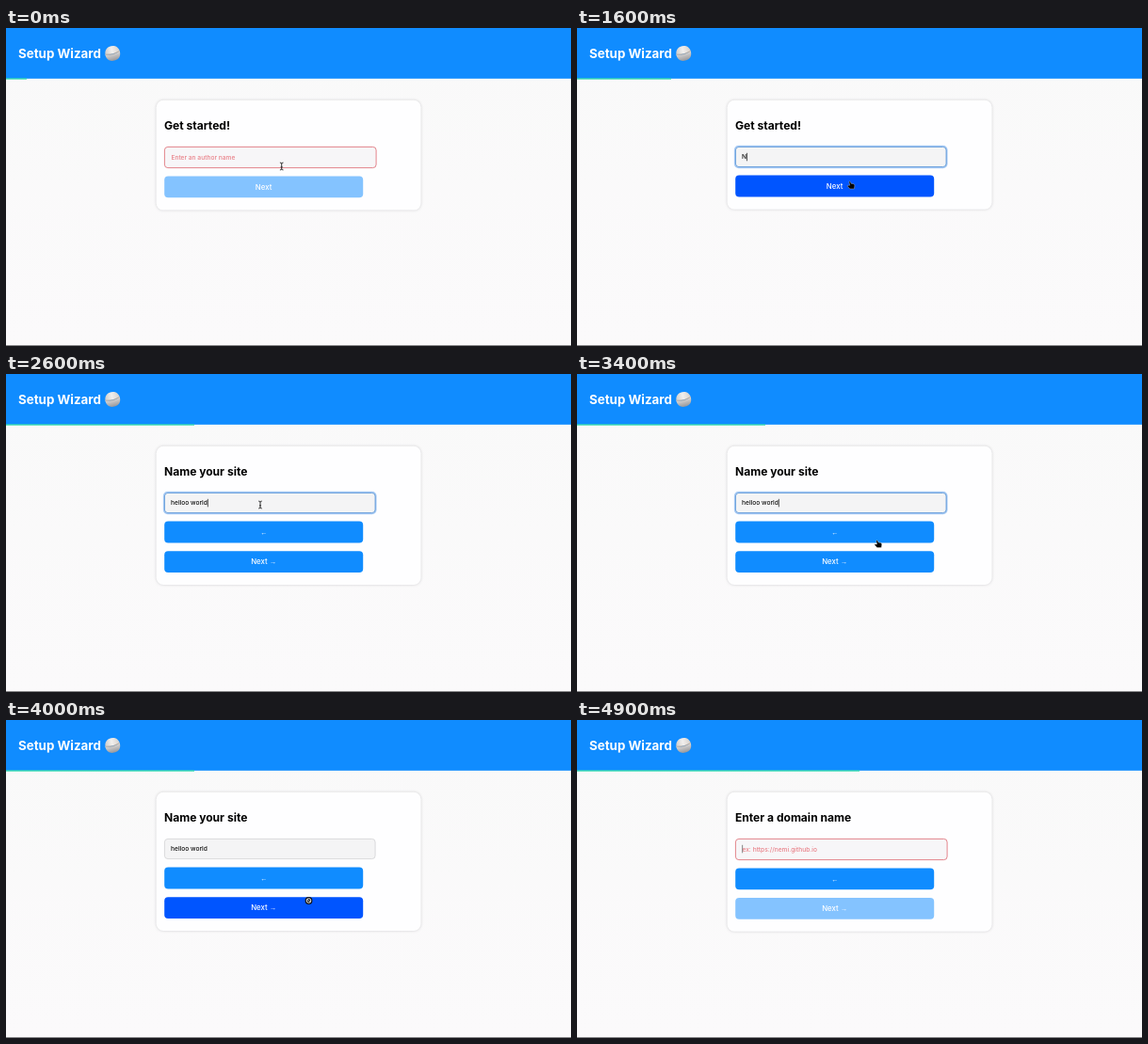
Animation of 600x338 px, one loop 5000 ms. Source, as an HTML page:

```html
<!DOCTYPE html>
<html lang="en">
<head>
<meta charset="utf-8">
<title>Setup Wizard</title>
<style>
  html, body { margin: 0; width: 100%; height: 100%; overflow: hidden; background: #fafafa; }
  svg { display: block; width: 100vw; height: 100vh; }
  text { font-family: Inter, Roboto, sans-serif; white-space: pre; }
  #title { font-size: 13.35px; font-weight: 700; fill: #fff; }
  #heading { font-size: 12.05px; font-weight: 700; }
  #value { font-size: 6.65px; font-weight: 500; }
  .label { font-size: 7.8px; font-weight: 500; fill: #fff; text-anchor: middle; }
  .arrow { font-family: "Liberation Sans", sans-serif; font-size: 7.3px; }
  #card { filter: drop-shadow(0 0 1.8px rgba(30, 30, 40, .2)); }
</style>
</head>
<body>
<svg viewBox="0 0 600 338">
  <defs>
    <linearGradient id="page" x2="0" y2="1">
      <stop stop-color="#f9f9f9"/><stop offset="1" stop-color="#fbfafb"/>
    </linearGradient>
    <linearGradient id="bowl" x2="0" y2="1">
      <stop stop-color="#dcdad9"/><stop offset="1" stop-color="#98989b"/>
    </linearGradient>
    <linearGradient id="grains">
      <stop stop-color="#cfcdcc"/><stop offset=".5" stop-color="#f1efed"/><stop offset="1" stop-color="#d8d2cd"/>
    </linearGradient>
  </defs>
  <rect width="600" height="338" fill="url(#page)"/>
  <rect width="600" height="53.8" fill="#108cff"/>
  <rect id="progress" y="53.4" height="1.2" fill="#20dba6"/>
  <rect y="337" width="600" height="1" fill="#858587"/>
  <text id="title" x="13" y="32">Setup Wizard</text>
  <g transform="translate(113.2 26.8) rotate(-14)">
    <path d="M-7.800 .5C-8.500-10.500 8.500-10.500 7.800 .5Z" fill="url(#grains)"/>
    <path d="M-8-.5Q0 2.500 8-.5C8 5 5 8 0 8S-8 5-8-.5Z" fill="url(#bowl)"/>
    <path d="M-7.600-.4Q0 2.500 7.600-.4" fill="none" stroke="#b5a699" stroke-width=".8"/>
  </g>

  <rect id="card" x="159.600" y="76.700" width="281" rx="7.500" fill="#fefeff"/>
  <text id="heading" x="168" y="108"></text>
  <rect id="ring" x="167.600" y="125.600" width="225.200" height="22.800" rx="4" fill="none" stroke="#a9cbf5" stroke-width="1.500"/>
  <rect id="field" x="168.400" y="126.400" rx="3.500"/>
  <text id="value"></text>
  <rect id="caret" y="132.800" width=".7" height="8.500"/>
  <g id="back">
    <rect x="168.200" width="211" height="22.800" rx="4" fill="#108cff"/>
    <text class="label" x="273.600" y="14.300"><tspan class="arrow">←</tspan></text>
  </g>
  <g id="next">
    <rect id="nextFill" x="168.200" width="211" height="22.800" rx="4"/>
    <text class="label" x="273.600" y="14.300">Next<tspan id="nextArrow" class="arrow"> →</tspan></text>
  </g>

  <g id="ibeam" fill="none" stroke="#222" stroke-width=".9">
    <path d="M-1.800-3.900Q0-3.900 0-2.800Q0-3.900 1.800-3.900M0-3V3M-1.800 3.900Q0 3.900 0 2.800Q0 3.900 1.800 3.900M-1 .8H1"/>
  </g>
  <g id="hand">
    <path d="M-1.800-4Q-.8-4.800-.2-3.700L.5-2L3.200-1.600Q4.300-1.300 4.200 .5L3.700 3.600H-.8L-3.400 .8Q-3.600-.6-2.200 0L-1-.1Z" fill="#050505" stroke="#fff" stroke-width=".3"/>
  </g>
  <g id="denied" fill="none">
    <circle r="3.900" fill="#111"/>
    <circle r="2.300" stroke="#fff" stroke-width=".9"/>
    <path d="M-1.600-1.600L1.600 1.600" stroke="#fff" stroke-width=".9"/>
  </g>
</svg>
<script>
const LOOP = 5000, STEP = 100;
const $ = id => document.getElementById(id);
const clamp = x => Math.max(0, Math.min(1, x));
const set = (el, attrs) => { for (const key in attrs) el.setAttribute(key, attrs[key]); };
const show = (el, on) => { el.style.display = on ? "" : "none"; };
const between = (t, a, b) => t >= a && t < b;
const mixColor = (a, b, k) => `rgb(${a.map((v, i) => Math.round(v + (b[i] - v) * k))})`;

const BLUE = [16, 140, 255], DARK = [0, 85, 255];
const pages = [
  { start: 0, heading: "Get started!", hint: "Enter an author name" },
  { start: 1800, heading: "Name your site", hint: "" },
  { start: 4200, heading: "Enter a domain name", hint: "ex: https://nemi.github.io" }
];

// Pointer paths: [time, x, y]; each path is visible from its first to its last time.
const paths = [
  [[0, 292.7, 147], [300, 268, 139], [700, 268, 139]],
  [[1200, 268, 139], [1500, 290, 166], [1800, 292, 170]],
  [[2200, 292, 160], [2400, 270, 139], [2700, 270, 139]],
  [[3000, 300, 138], [3400, 319.5, 181], [3600, 321.5, 192], [4200, 321.5, 192],
   [4500, 279.3, 164.3], [4700, 255, 139], [4800, 250, 138]]
];

function pointerAt(t) {
  const path = paths.find(p => between(t, p[0][0], p[p.length - 1][0]));
  if (!path) return null;
  const i = path.findIndex(p => p[0] > t);
  const [t0, x0, y0] = path[i - 1], [t1, x1, y1] = path[i];
  const k = (t - t0) / (t1 - t0);
  return { x: x0 + (x1 - x0) * k, y: y0 + (y1 - y0) * k };
}

function pointerKind(p, t) {
  if (between(t, 3900, 4400)) return "denied";
  return p.y < 150 ? "ibeam" : "hand";
}

// How far the Next button has faded to its hover colour.
function hoverAmount(t) {
  if (t < 1800) return clamp((t - 1400) / 200);
  if (t < 3500) return 0;
  return t < 4500 ? clamp((t - 3500) / 200) : 1 - clamp((t - 4500) / 300);
}

function progressAt(t, index) {
  const elapsed = t - pages[index].start;
  const from = index * 100;
  const rest = index ? .3 : .78;
  const duration = index ? 100 : 300;
  return from + 100 * (1 - rest * (1 - clamp(elapsed / duration)) ** 2);
}

function draw(time) {
  const t = Math.floor(time % LOOP / STEP) * STEP;
  const index = pages.findLastIndex(p => t >= p.start);
  const page = pages[index];
  const text = index === 0 ? (t >= 700 ? "N" : "") : index === 1 ? "helloo world" : "";
  const invalid = !text;
  const shift = invalid ? .8 : 0;
  const focused = between(t, 300, 1700) || between(t, 2400, 3700) || t >= 4800;

  set($("progress"), { width: progressAt(t, index) });
  set($("card"), { height: (index ? 147.3 : 116.1) + shift });
  $("heading").textContent = page.heading;

  show($("ring"), focused && !invalid);
  set($("field"), {
    width: invalid ? 224.7 : 223.7,
    height: invalid ? 22.2 : 21.2,
    fill: invalid ? "#f7f6f8" : "#f4f4f5",
    stroke: invalid ? "#e0787f" : focused ? "#4388d2" : "#d2d2d5",
    "stroke-width": invalid ? .9 : .8
  });
  const textX = 175 + shift / 2;
  const value = $("value");
  value.textContent = text || page.hint;
  set(value, { x: textX, y: 139.4 + shift / 2, fill: invalid ? "#e98189" : "#111" });
  show($("caret"), focused);
  set($("caret"), { x: textX + (text ? value.getComputedTextLength() : 0), fill: invalid ? "#555" : "#111" });

  const buttonY = 156.6 + shift;
  show($("back"), index > 0);
  set($("back"), { transform: `translate(0 ${buttonY})` });
  set($("next"), { transform: `translate(0 ${buttonY + (index ? 31.6 : 0)})` });
  set($("nextFill"), {
    fill: mixColor(BLUE, DARK, hoverAmount(t)),
    "fill-opacity": invalid ? .51 : 1
  });
  show($("nextArrow"), index > 0);

  const pointer = pointerAt(t);
  const kind = pointer && pointerKind(pointer, t);
  for (const id of ["ibeam", "hand", "denied"]) {
    show($(id), id === kind);
    if (id === kind) set($(id), { transform: `translate(${pointer.x} ${pointer.y})` });
  }
}

const start = performance.now();
function tick() {
  draw(performance.now() - start);
  requestAnimationFrame(tick);
}
tick();
</script>
</body>
</html>
```
